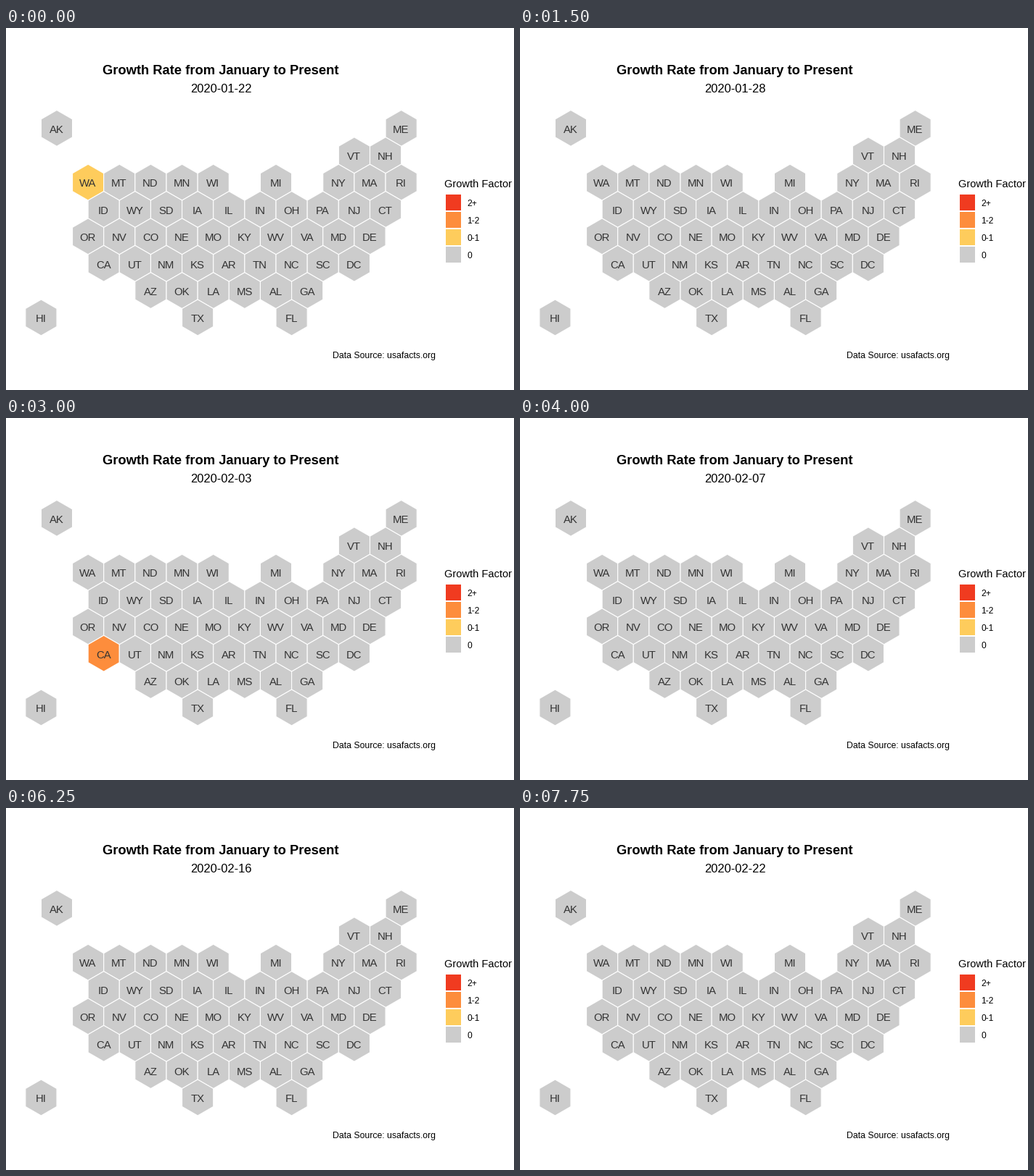
A matplotlib script that plays this animation: 700x500 px, repeating every 8000 ms.

```python
import math

import matplotlib.pyplot as plt
from matplotlib.animation import FuncAnimation
from matplotlib.patches import Polygon, Rectangle

W, H = 700, 500
FRAMES, INTERVAL = 32, 250

GREY, YELLOW, ORANGE, RED = "#cccccc", "#fecc5c", "#fd8d3c", "#f03b20"

# Each character is half a hexagon wide, each row one step down.
GRID = [
    " AK                    ME",
    "                    VTNH",
    "   WAMTNDMNWI  MI  NYMARI",
    "    IDWYSDIAILINOHPANJCT",
    "   ORNVCONEMOKYWVVAMDDE",
    "    CAUTNMKSARTNNCSCDC",
    "       AZOKLAMSALGA",
    "HI        TX    FL",
]
X0, Y0 = 48.4, 138.4
HALF = 21.575
RADIUS = 2 * HALF / math.sqrt(3)

# Day number -> coloured states; all others stay grey.
GROWTH = {
    0: {"WA": YELLOW},
    2: {"IL": YELLOW},
    4: {"CA": ORANGE, "AZ": YELLOW},
    9: {"IL": YELLOW},
    10: {"CA": YELLOW, "MA": YELLOW},
    11: {"CA": YELLOW},
    12: {"CA": ORANGE},
    14: {"WI": YELLOW},
    20: {"CA": YELLOW},
    22: {"CA": YELLOW},
    30: {"CA": ORANGE},
}

plt.rcParams["font.family"] = "Liberation Sans"
fig = plt.figure(figsize=(W / 72, H / 72), dpi=72, facecolor="white")
ax = fig.add_axes([0, 0, 1, 1])
ax.set_xlim(0, W)
ax.set_ylim(H, 0)
ax.axis("off")


def write(x, y, text, size, ha="left", **style):
    return ax.text(x, y, text, fontsize=size, ha=ha, va="baseline", **style)


def add_hex(cx, cy):
    angles = [math.radians(30 + 60 * i) for i in range(6)]
    points = [(cx + RADIUS * math.cos(a), cy + RADIUS * math.sin(a)) for a in angles]
    return ax.add_patch(Polygon(points, facecolor=GREY, edgecolor="white", lw=1.1))


def build_map():
    hexes = {}
    for row, line in enumerate(GRID):
        col = 0
        while col < len(line):
            if line[col] == " ":
                col += 1
                continue
            name = line[col:col + 2]
            cx, cy = X0 + col * HALF, Y0 + row * 1.5 * RADIUS
            hexes[name] = add_hex(cx, cy)
            write(cx - 0.4, cy + 6.3, name, 14.9, ha="center", color="#333333")
            col += 2
    return hexes


def build_legend():
    write(603.6, 220, "Growth Factor", 14.67)
    keys = [("2+", RED), ("1-2", ORANGE), ("0-1", YELLOW), ("0", GREY)]
    for i, (label, color) in enumerate(keys):
        y = 230 + 24 * i
        ax.add_patch(Rectangle((605.7, y), 21.6, 21.6, facecolor=color, lw=0))
        write(635, y + 16, label, 12)


def date_text(day):
    n = 22 + day
    return f"2020-01-{n:02d}" if n <= 31 else f"2020-02-{n - 31:02d}"


hexes = build_map()
build_legend()
write(295.7, 64, "Growth Rate from January to Present", 18.35, ha="center", weight="bold")
date = write(296, 89, date_text(0), 16.5, ha="center")
write(450.5, 456, "Data Source: usafacts.org", 12.25)


def update(day):
    date.set_text(date_text(day))
    colors = GROWTH.get(day, {})
    for name, patch in hexes.items():
        patch.set_facecolor(colors.get(name, GREY))
    return [date, *hexes.values()]


anim = FuncAnimation(fig, update, frames=FRAMES, interval=INTERVAL,
                     repeat=True, repeat_delay=0, blit=False)
plt.show()
```
